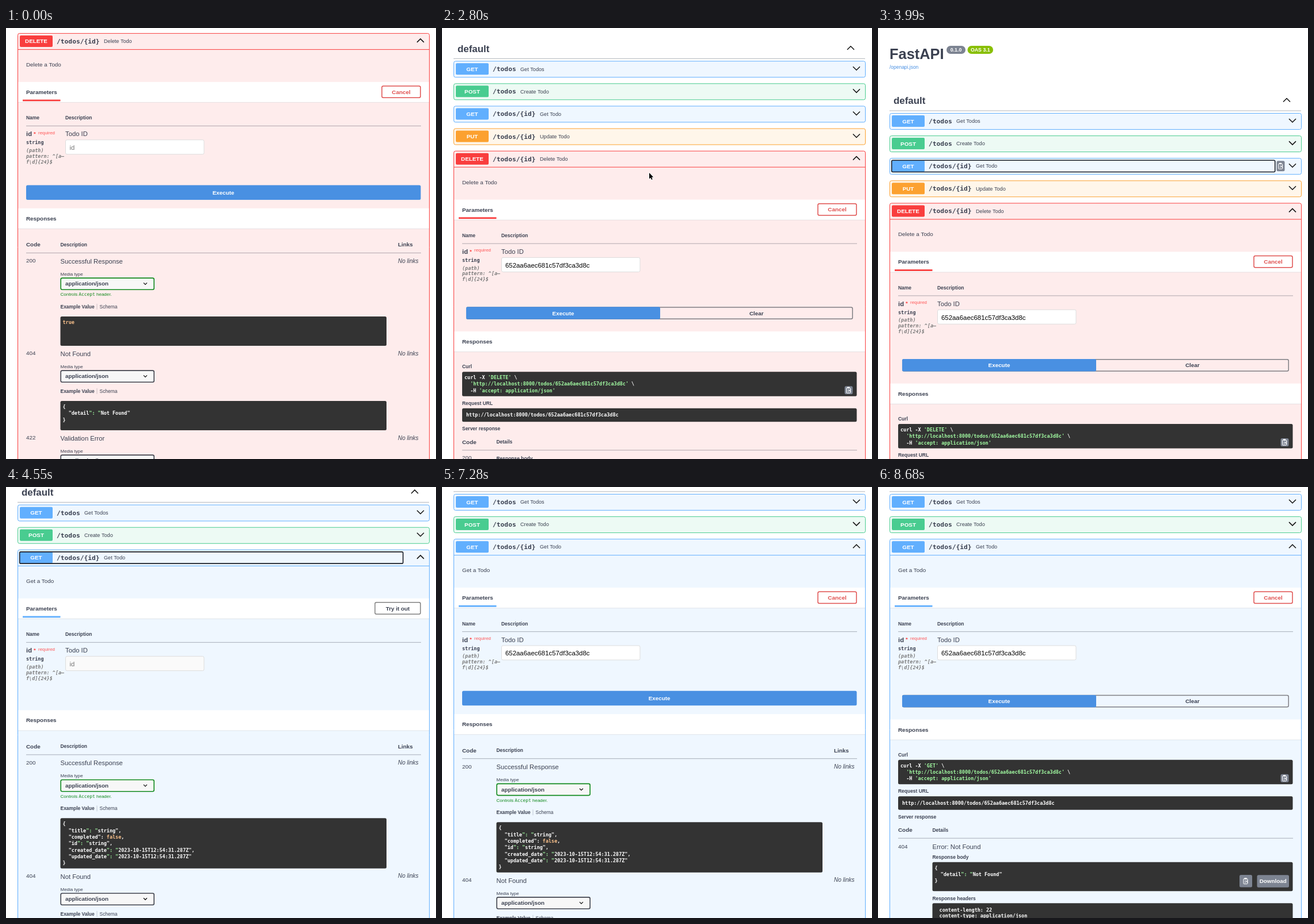
Animation of 747x750 px, one loop 9.24 s. Source, as an HTML page with a canvas:

```html
<!DOCTYPE html>
<html lang="en">
<head>
<meta charset="utf-8">
<title>API docs</title>
<style>
html, body { margin: 0; width: 100%; height: 100%; overflow: hidden; background: #fff; }
canvas { display: block; }
</style>
</head>
<body>
<canvas id="stage" width="747" height="750"></canvas>
<script>
const ctx = document.getElementById('stage').getContext('2d');
const LOOP = 9240, STEP = 70;
const SANS = '"Liberation Sans", Arial, sans-serif', MONO = '"DejaVu Sans Mono", monospace';
const INK = '#3b4151', DARK = '#333', GRAY = '#7d8492', BLUE = '#4990e2', RED = '#e0504f';
const ID = '652aa6aec681c57df3ca3d8c', URL_TEXT = 'http://localhost:8000/todos/' + ID;
const COLORS = {
  GET: ['#61affe', '#eff7ff'], POST: ['#49cc90', '#edfaf4'],
  PUT: ['#fca130', '#fff6ea'], DELETE: ['#f93e3e', '#feecec']
};
const ROWS = [
  ['GET', '/todos', 'Get Todos'], ['POST', '/todos', 'Create Todo'],
  ['GET', '/todos/{id}', 'Get Todo'], ['PUT', '/todos/{id}', 'Update Todo'],
  ['DELETE', '/todos/{id}', 'Delete Todo']
];
const PITCH = 39.1;
const NOT_FOUND = ['{', '  "detail": "Not Found"', '}'];
const TODO = ['{', '  "title": "string",', '  "completed": false,', '  "id": "string",',
  '  "created_date": "2023-10-15T12:54:31.287Z",', '  "updated_date": "2023-10-15T12:54:31.287Z"', '}'];

const clamp = v => Math.min(1, Math.max(0, v));
const easeOut = (t, start, length, power) => 1 - (1 - clamp((t - start) / length)) ** power;

// y is the middle of the capital letters
function text(s, x, y, size, o = {}) {
  ctx.font = `${o.italic ? 'italic ' : ''}${o.bold ? 'bold ' : ''}${size}px ${o.mono ? MONO : SANS}`;
  ctx.textAlign = o.align || 'left';
  ctx.fillStyle = o.color || INK;
  ctx.fillText(s, x, y + size * 0.36);
}
const bold = (s, x, y, size = 9.87, color = INK) => text(s, x, y, size, { bold: 1, color });
const centered = (s, x, y, color, size = 9.87) => text(s, x, y, size, { bold: 1, color, align: 'center' });
const small = (s, x, y) => bold(s, x, y, 8.46);

function box(x, y, w, h, fill, stroke, line = 1, r = 2.5) {
  ctx.beginPath();
  ctx.roundRect(x, y, w, h, r);
  if (fill) { ctx.fillStyle = fill; ctx.fill(); }
  if (stroke) { ctx.strokeStyle = stroke; ctx.lineWidth = line; ctx.stroke(); }
}
function rect(x, y, w, h, color) {
  ctx.fillStyle = color;
  ctx.fillRect(x, y, w, h);
}
const rule = (y, x = 35, w = 686) => rect(x, y - 0.5, w, 1, 'rgba(59,65,81,.4)');

function chevron(x, y, up, w = 6, line = 1.5) {
  const d = up ? -w / 2 : w / 2;
  ctx.beginPath();
  ctx.moveTo(x - w, y - d);
  ctx.lineTo(x, y + d);
  ctx.lineTo(x + w, y - d);
  ctx.strokeStyle = '#111';
  ctx.lineWidth = line;
  ctx.stroke();
}

function codeLine(s, x, y) {
  ctx.font = `bold 8.46px ${MONO}`;
  ctx.textAlign = 'left';
  for (const part of s.split(/("[^"]*"(?!:)|'[^']*'|true|false)/)) {
    ctx.fillStyle = /^["'].*["']$/.test(part) ? '#a2fca2' : /^(true|false)$/.test(part) ? '#fcc28c' : '#fff';
    ctx.fillText(part, x, y + 3);
    x += ctx.measureText(part).width;
  }
}
function codeBox(lines, x, y, w, h, pitch = 11.35, padX = 4, padY = 10) {
  box(x, y, w, h, DARK);
  lines.forEach((s, i) => codeLine(s, x + padX, y + padY + i * pitch));
}

function copyIcon(x, y, w, h) {
  box(x - w / 2, y - h / 2, w, h, GRAY, null, 1, 2.5);
  box(x - 4, y - 4, 7, 9, null, '#fff', 1, 1);
  rect(x - 2.5, y - 5.5, 4, 2.5, '#fff');
  rect(x - 2, y - 0.5, 3.5, 1, '#fff');
  rect(x - 2, y + 2, 2, 1, '#fff');
  ctx.beginPath();
  ctx.moveTo(x + 4, y - 1);
  ctx.lineTo(x + 1, y + 1);
  ctx.lineTo(x + 4, y + 3);
  ctx.strokeStyle = '#fff';
  ctx.stroke();
}

function header([method, path, label], y, open) {
  const [color, pale] = COLORS[method];
  box(20.5, y + 0.5, 715, open ? 1500 : 28, pale, color, 1, 3);
  if (open) rect(21, y + 28, 714, 1, color);
  box(24, y + 4, 57, 20, color, null, 1, 2);
  centered(method, 52.5, y + 14, '#fff');
  text(path, 88, y + 14, 11.28, { mono: 1, bold: 1 });
  text(label, path.length > 6 ? 170 : 136, y + 14, 9.15);
  chevron(720, y + 13, open);
}

function band(y, label) {
  rect(21, y, 714, 35.5, '#fff');
  rect(21, y + 35, 714, 1, 'rgba(59,65,81,.12)');
  bold(label, 35, y + 17.5);
}

function select(y, accent) {
  box(95.2, y + 0.7, 162, 20.2, '#f7f7f7', accent, 1.6);
  bold('application/json', 103, y + 10.5);
  chevron(242, y + 10.5, false, 3, 1.3);
}

// Documented responses; y is the top of the table
function responseTable(y, lines) {
  bold('Code', 35, y + 28);
  small('Description', 94.5, y + 28);
  bold('Links', 681, y + 28);
  rule(y + 42.5);
  y += 56;
  const list = [['200', 'Successful Response', lines], ['404', 'Not Found', NOT_FOUND],
    ['422', 'Validation Error', NOT_FOUND]];
  list.forEach(([code, title, body], i) => {
    const extra = i ? 0 : 14, h = Math.max(51, body.length * 11.35 + 8);
    text(code, 35, y, 9.87);
    text(title, 94.5, y + 1, 11.28);
    text('No links', 681, y, 10, { italic: 1 });
    text('Media type', 94.5, y + 23, 8);
    select(y + 29.5, i ? '#41444e' : '#128a1e');
    if (!i) {
      const color = '#128a1e';
      text('Controls', 94.5, y + 58.5, 8, { color });
      text('Accept', 126.3, y + 58.5, 7.9, { color, mono: 1 });
      text('header.', 157, y + 58.5, 8, { color });
    }
    small('Example Value', 94.5, y + 66 + extra);
    rect(157.5, y + 61 + extra, 1, 10, 'rgba(59,65,81,.25)');
    text('Schema', 162.5, y + 66 + extra, 8.46);
    codeBox(body, 94.5, y + 83 + extra, 566.5, h);
    y += 96 + extra + h;
  });
}

// Live answer; y is the top of the block
function liveResponse(y, method) {
  small('Curl', 35, y + 375.5);
  codeBox([`curl -X '${method}' \\`, `  '${URL_TEXT}' \\`, "  -H 'accept: application/json'"], 35, y + 384.5, 685.5, 42.5);
  copyIcon(706.5, y + 416.5, 14, 14);
  small('Request URL', 35, y + 439);
  codeBox([URL_TEXT], 35, y + 448, 685.5, 23.5, 10, 7, 11.7);
  small('Server response', 35, y + 483.5);
  bold('Code', 35, y + 506.5);
  small('Details', 94.5, y + 506.5);
  rule(y + 521);
  const ok = method === 'DELETE';
  text(ok ? '200' : '404', 35, y + 535 - ok, 9.87);
  if (ok) y -= 19;
  else text('Error: Not Found', 94.5, y + 535.5, 11.28);
  small('Response body', 94.5, y + 554);
  codeBox(ok ? ['true'] : NOT_FOUND, 94.5, y + 562.5, 626, 50.5);
  copyIcon(639, y + 595.5, 22, 21.5);
  box(658.5, y + 585, 55.5, 21.5, GRAY);
  centered('Download', 686.2, y + 595.7, '#fff');
  small('Response headers', 94.5, y + 625.5);
  codeBox([` content-length: ${ok ? 4 : 22}`, ' content-type: application/json',
    ' date: Sun,15 Oct 2023 12:54:34 GMT', ' server: uvicorn'], 94.5, y + 634, 626, 54, 10.2, 7, 11.7);
  bold('Responses', 35, y + 708);
  responseTable(y + 708, ok ? ['true'] : TODO);
}

function spinner(y, t) {
  const a = t / 1000 * Math.PI * 2;
  ctx.lineWidth = 1.5;
  ctx.strokeStyle = 'rgba(85,85,85,.16)';
  ctx.beginPath();
  ctx.arc(379, y, 22, 0, 7);
  ctx.stroke();
  ctx.strokeStyle = 'rgba(0,0,0,.6)';
  ctx.beginPath();
  ctx.arc(379, y, 22, a - Math.PI * 0.75, a - Math.PI * 0.25);
  ctx.stroke();
  centered('LOADING', 377.7, y - 1, INK, 7.05);
}

// s: editing, filled, loadAt, doneAt, hover
function openBlock(row, y, t, s) {
  const method = row[0], color = COLORS[method][0];
  header(row, y, true);
  text(method === 'GET' ? 'Get a Todo' : 'Delete a Todo', 35, y + 54.5, 9.87);
  band(y + 85, 'Parameters');
  rect(29, y + 115.7, 65.5, 2.8, color);
  const bw = s.editing ? 67 : 79;
  box(720 - bw, y + 92, bw, 20.3, null, s.editing ? RED : '#808080', 1.5);
  centered(s.editing ? 'Cancel' : 'Try it out', 720 - bw / 2, y + 102.3, s.editing ? RED : INK);

  small('Name', 35, y + 147.5);
  small('Description', 103, y + 147.5);
  rule(y + 161.5);
  bold('id', 35, y + 175.3, 11.28);
  bold('*', 48, y + 174.5, 9.5, '#f44');
  text('required', 56, y + 173, 7.9, { color: '#f55' });
  text('string', 35, y + 190.5, 8.46, { mono: 1, bold: 1 });
  ['(path)', 'pattern: ^[a–', 'f\\d]{24}$'].forEach((line, i) =>
    text(line, 35, y + 204 + i * 9.8, 8.46, { mono: 1, bold: 1, italic: 1, color: '#7c7c7c' }));
  text('Todo ID', 103, y + 175.5, 11.28);
  box(103.5, y + 185.8, 240.5, 25, s.editing ? '#fff' : '#fafafa', '#ddd');
  if (s.filled) text(ID, 110, y + 199, 11.42, { color: '#000' });
  else text('id', 110.5, y + 199, 11.28, { color: '#757575' });

  let top = y + 279.5;
  if (t >= s.doneAt) {
    const e = easeOut(t, s.doneAt, 300, 2), w = 97 + 240 * e, grow = 5.5 * (1 - e), mid = y + 282.5 + grow / 2;
    box(42.7, y + 272.4, 670.5, 20.2 + grow, null, '#7f7f84', 1.5);
    box(42, y + 271.7, w, 21.3 + grow, BLUE);
    centered('Execute', 42 + w / 2, mid, '#fff');
    centered('Clear', (42 + w + 713.5) / 2, mid, INK);
    band(y + 314.3 + grow, 'Responses');
    liveResponse(y + grow, method);
    return;
  }
  if (s.editing) {
    ctx.save();
    if (t >= s.hoverAt) {
      ctx.shadowColor = 'rgba(0,0,0,.3)';
      ctx.shadowBlur = 4;
    }
    box(35, y + 264.5, 685.5, 25.5, BLUE);
    ctx.restore();
    centered('Execute', 377.7, y + 277.5, '#fff');
    top = y + 305;
  }
  if (t >= s.loadAt) {
    spinner(y + 345, t - s.loadAt);
    top += 82;
  }
  band(top, 'Responses');
  responseTable(top + 35, method === 'GET' ? TODO : ['true']);
}

function pill(s, x, y, w, color) {
  box(x, y - 7, w, 14, color, null, 1, 7);
  centered(s, x + w / 2, y, '#fff', 8.8);
}

function cursor(x, y) {
  ctx.beginPath();
  [[0, 0], [0, 10.5], [2.4, 8.4], [4, 12], [5.7, 11.2], [4.1, 7.7], [7.2, 7.5]]
    .forEach(([dx, dy]) => ctx.lineTo(x + dx, y + dy));
  ctx.closePath();
  ctx.lineWidth = 1.4;
  ctx.strokeStyle = '#fff';
  ctx.stroke();
  ctx.fillStyle = '#000';
  ctx.fill();
}

function draw(t) {
  rect(0, 0, 747, 750, '#fff');
  const y0 = -147.5 + 295.5 * easeOut(t, 2682, 960, 9) - 136 * easeOut(t, 4280, 690, 4);

  bold('FastAPI', 20, y0 - 103, 25.4);
  pill('0.1.0', 119, y0 - 110, 33, GRAY);
  pill('OAS 3.1', 155.5, y0 - 110, 44.5, '#89bf04');
  text('/openapi.json', 20, y0 - 80, 8.46, { color: BLUE });
  bold('default', 27, y0 - 21.7, 16.9);
  chevron(710, y0 - 22.5, true);
  rule(y0 - 4, 20, 715);

  const getOpen = t >= 4060, getY = y0 + 2 * PITCH;
  ROWS.slice(0, getOpen ? 2 : 4).forEach((row, i) => header(row, y0 + i * PITCH));
  if (getOpen) {
    openBlock(ROWS[2], getY, t, { editing: t >= 5390, filled: t >= 7140, hoverAt: 7560, loadAt: 7600, doneAt: 7685 });
  } else {
    openBlock(ROWS[4], y0 + 4 * PITCH, t, { editing: true, filled: t >= 980, hoverAt: 1540, loadAt: 1940, doneAt: 2080 });
  }
  if (t >= 3710 && t < 4340) copyIcon(699.5, getY + 14, 14, 18);
  if (t >= 3920 && t < 5390) box(23.7, getY + 4, 666, 20.3, null, '#1b1f27', 1.6, 2);
  if (t >= 2730 && t < 3150) cursor(360, 252);
  if (t >= 5880 && t < 6160) rect(745.5, 38, 1.5, 227, '#a5a5a5');
}

function frame(now) {
  draw(Math.floor(now % LOOP / STEP) * STEP);
  requestAnimationFrame(frame);
}
requestAnimationFrame(frame);
</script>
</body>
</html>
```
